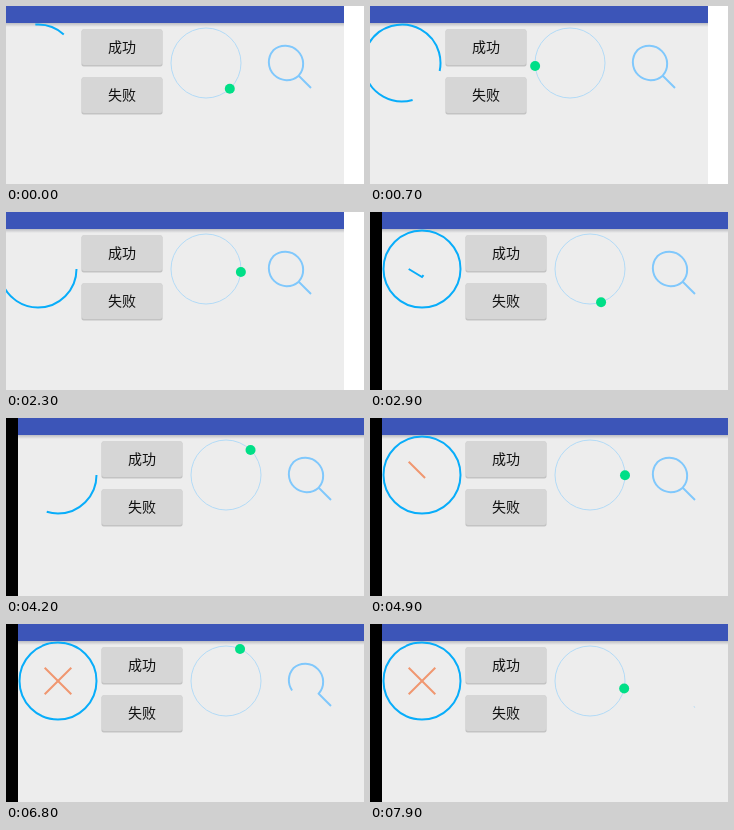
An HTML page for the animation above (8000 ms loop, 358 by 178 pixels).

```html
<!DOCTYPE html>
<html lang="zh">
<head>
<meta charset="utf-8">
<style>
html, body { margin: 0; width: 100%; height: 100%; overflow: hidden; background: #fff; }
svg { display: block; width: 358px; height: 178px; }
text { font: 14px "Noto Sans CJK SC", "Noto Sans CJK", sans-serif; text-anchor: middle; fill: #111; }
.line { fill: none; stroke-width: 2; }
.blue { stroke: #08adfa; }
.fail { stroke: #f09770; }
.sky { stroke: #80c8fc; }
</style>
</head>
<body>
<svg viewBox="0 0 358 178">
  <defs>
    <linearGradient id="shade" x2="0" y2="1">
      <stop stop-color="#bcbdc2"/>
      <stop offset="1" stop-color="#ededed"/>
    </linearGradient>
    <g id="button">
      <rect x="75.5" y="23.5" width="81" height="37" rx="2" fill="#c3c3c3"/>
      <rect x="76" y="23" width="80" height="36" rx="2" fill="#d6d6d6"/>
    </g>
  </defs>
  <g id="window">
    <rect x="-28" width="20" height="178"/>
    <rect x="-8" width="346" height="178" fill="#ededed"/>
    <rect x="-8" width="346" height="17" fill="#3c55b8"/>
    <rect x="-8" y="17" width="346" height="4" fill="url(#shade)"/>
    <use href="#button"/>
    <use href="#button" y="48"/>
    <text x="116" y="46">成功</text>
    <text x="116" y="94">失败</text>

    <g transform="translate(32 57)">
      <circle id="ring" class="line blue" r="38.5" pathLength="1"/>
      <path id="tick" class="line blue" d="M-13.3 0L0 8L13.3-8" pathLength="1"/>
      <path id="crossA" class="line fail" d="M-13.3-13.3L13.3 13.3" pathLength="1"/>
      <path id="crossB" class="line fail" d="M13.3-13.3L-13.3 13.3" pathLength="1"/>
    </g>

    <circle cx="200" cy="57" r="35" fill="none" stroke="#acd9f8" stroke-width=".9"/>
    <circle id="ball" r="5" fill="#00df87"/>

    <path id="glass" class="line sky" pathLength="1"
      d="M292.7 69.7A18 18 0 0 1 267.3 44.3A18 18 0 0 1 292.7 69.7L305 82"/>
    <circle id="orbit" class="line sky" r="35.6" pathLength="1" transform="translate(280 57) rotate(45)"/>
  </g>
</svg>
<script>
const $ = id => document.getElementById(id);
const clamp = u => Math.min(1, Math.max(0, u));
const ease = u => (1 - Math.cos(Math.PI * clamp(u))) / 2;
const LOOP = 8000, STEP = 100, STROKE = 580;

// Show only the part of a path between fractions a and b.
function segment(id, a, b) {
  const el = $(id);
  el.style.display = b - a > 0.0005 ? "" : "none";
  el.setAttribute("stroke-dasharray", `0 ${a} ${b - a} 2`);
}

// Each press redraws the ring, then the strokes of its result in turn.
const presses = [
  { at: 1226, marks: ["tick"] },
  { at: 2033, marks: ["tick"] },
  { at: 3987, marks: ["crossA", "crossB"] }
];

function drawStatus(t) {
  const press = presses.filter(p => t >= p.at).pop();
  const parts = press ? press.marks : [];
  for (const id of ["tick", "crossA", "crossB"]) {
    const i = parts.indexOf(id);
    segment(id, 0, i < 0 ? 0 : ease((t - press.at) / STROKE - 1 - i));
  }
  let start = 0, sweep;
  if (press) {
    sweep = ease((t - press.at) / STROKE);
  } else {
    const s = t / 1000, grow = Math.min(s, 0.706), shrink = s - grow;
    start = -94 + 240 * s + 360 * shrink;
    sweep = (46 + 360 * (grow - shrink)) / 360;
  }
  $("ring").setAttribute("transform", `rotate(${start})`);
  segment("ring", 0, sweep);
}

function drawBall(t) {
  const period = 2740, u = ((t - 2094 + period) % period) / period;
  const a = 2 * Math.PI * ease(u);
  $("ball").setAttribute("cx", 200 + 35 * Math.cos(a));
  $("ball").setAttribute("cy", 57 + 35 * Math.sin(a));
}

function drawSearch(t) {
  segment("glass", ease((t - 6310) / 1500), 1);
  const v = ease((t - 7810) / 1830);
  segment("orbit", v - (0.5 - Math.abs(v - 0.5)) * 0.32, v);
}

function draw(now) {
  const t = Math.floor(now % LOOP / STEP) * STEP;
  const shift = Math.round(20 * clamp((t - 2514) / 286));
  $("window").setAttribute("transform", `translate(${shift})`);
  drawStatus(t);
  drawBall(t);
  drawSearch(t);
}

let origin;
function tick(now) {
  origin ??= now;
  draw(now - origin);
  requestAnimationFrame(tick);
}
draw(0);
requestAnimationFrame(tick);
</script>
</body>
</html>
```
